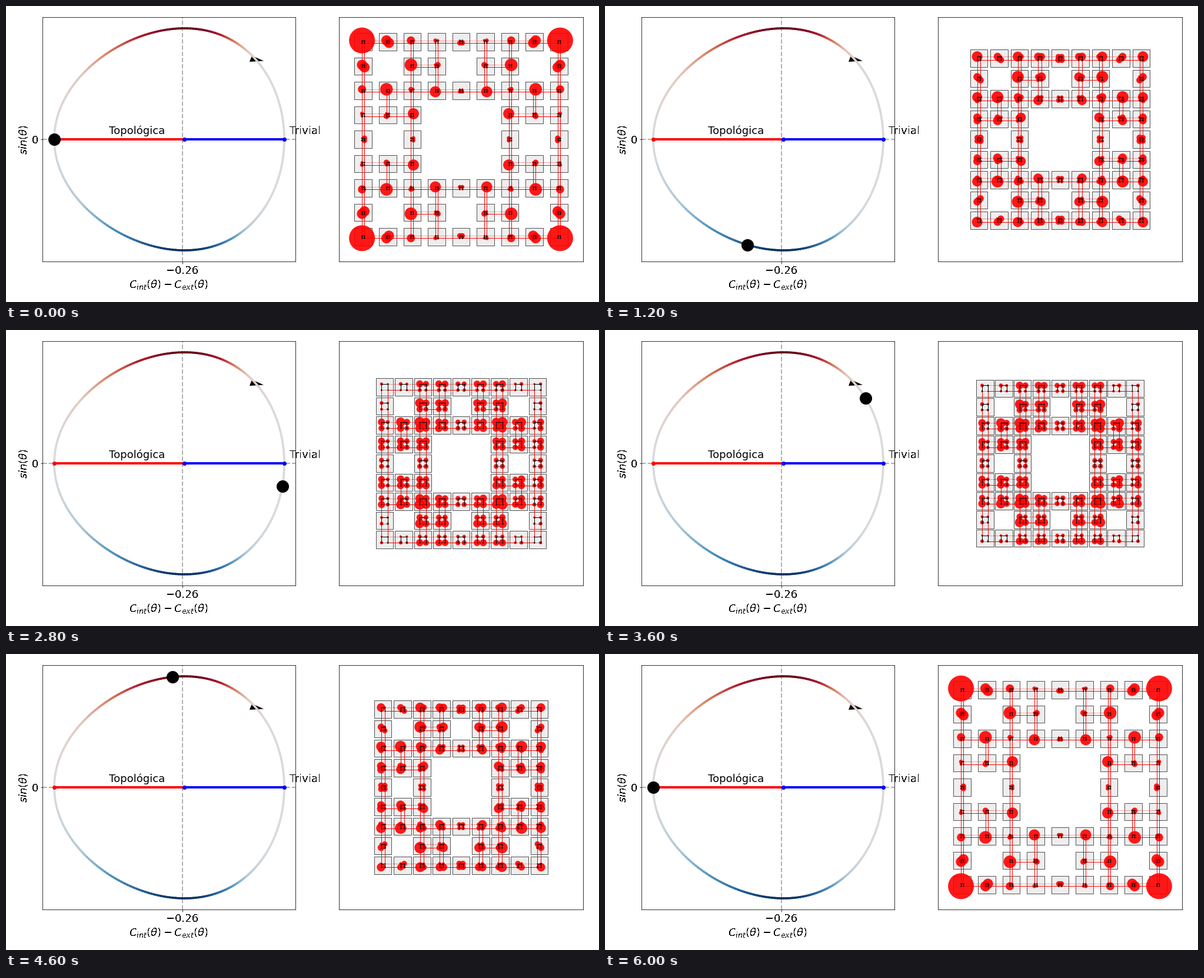
Animation of 1008x504 px, one loop 6200 ms. Source, as a matplotlib script:

```python
import numpy as np
import matplotlib.pyplot as plt
from matplotlib.animation import FuncAnimation
from matplotlib.collections import LineCollection, PolyCollection
from matplotlib.colors import LinearSegmentedColormap

W, H = 1008, 504
STEPS = 30
SIZE = 18
CX, CY = 773.5, 227.0      # middle of the lattice
BOX = 14.8                 # half side of a cell


def panel(fig, x0, x1, y0, y1):
    """Axes whose data units are stage pixels, y pointing down."""
    ax = fig.add_axes([x0 / W, 1 - y1 / H, (x1 - x0) / W, (y1 - y0) / H])
    ax.set_xlim(x0, x1)
    ax.set_ylim(y1, y0)
    return ax


# ---------------------------------------------------------------- cycle

def cycle(t):
    x = 290.5 + 193.9 * np.cos(t) - 13 * np.cos(2 * t) + 1.6 * np.cos(3 * t)
    return x, CY - 189 * np.sin(t)


def draw_cycle(ax):
    cmap = LinearSegmentedColormap.from_list("cycle", [
        "#053061", "#2a689f", "#5598c0", "#b0c8d6", "#dadadc",
        "#e4c8be", "#d6785a", "#b2182b", "#67001f"])
    ax.axvline(300, color="#b0b0b0", lw=2, ls="--", zorder=1)
    ax.axhline(CY, color="#b0b0b0", lw=2, ls="--", zorder=1)
    ax.fill([418, 414, 438], [84.5, 95, 93.5], color="black", lw=0, zorder=2)

    t = np.linspace(0, 2 * np.pi, 241)
    pts = np.column_stack(cycle(t))
    segs = np.stack([pts[:-1], pts[1:]], axis=1)
    mid = (t[:-1] + t[1:]) / 2
    s = np.sin(mid)
    tone = np.sign(s) * np.abs(s) ** (4.6 + 2.6 * np.cos(mid))
    curve = LineCollection(segs, cmap=cmap, lw=3.5, capstyle="projecting",
                           zorder=3)
    curve.set_array(tone)
    curve.set_clim(-1, 1)
    ax.add_collection(curve)

    for x0, x1, color in ((82.3, 303.3, "red"), (303.3, 473.3, "blue")):
        ax.plot([x0, x1], [CY, CY], color=color, lw=4, marker="o", ms=6,
                zorder=4)

    # text outside the panel has hard edges
    hard = dict(fontsize=SIZE, antialiased=False)
    ax.text(175, 218, "Topológica", fontsize=SIZE)
    ax.text(482, 218, "Trivial", **hard)
    ax.set_xticks([300], ["−0.26"], **hard)
    ax.set_yticks([CY], ["0"], **hard)
    ax.set_xlabel(r"$C_{int}(\theta)-C_{ext}(\theta)$", **hard)
    ax.set_ylabel(r"$sin(\theta)$", **hard)


# -------------------------------------------------------------- lattice

def is_hole(i, j):
    return (i % 3 == 1 and j % 3 == 1) or (i // 3 == 1 and j // 3 == 1)


CELLS = [(i, j) for i in range(9) for j in range(9) if not is_hole(i, j)]
INDEX = {c: n for n, c in enumerate(CELLS)}
GRID = np.array([(j - 4, i - 4) for i, j in CELLS], float)
# site order in a cell: top left, top right, bottom left, bottom right
CORNERS = np.array([(-1, -1), (1, -1), (-1, 1), (1, 1)], float)
RIGHT = [(n, INDEX[i, j + 1]) for n, (i, j) in enumerate(CELLS)
         if (i, j + 1) in INDEX]
DOWN = [(n, INDEX[i + 1, j]) for n, (i, j) in enumerate(CELLS)
        if (i + 1, j) in INDEX]


def hopping():
    """Inner and outer hopping from (TL, BR) sites to (TR, BL) sites."""
    n = len(CELLS)
    inner = np.kron(np.eye(n), [[1, 1], [1, -1]])
    outer = np.zeros((2 * n, 2 * n))
    for a, b in RIGHT:
        outer[2 * a, 2 * b] = 1
        outer[2 * b + 1, 2 * a + 1] = -1
    for a, b in DOWN:
        outer[2 * a + 1, 2 * b] = 1
        outer[2 * b, 2 * a + 1] = 1
    return inner, outer


INNER, OUTER = hopping()


def density(t):
    """Weight of the four mid-gap states on every site."""
    c = 0.43 * np.cos(t)
    u, _, vt = np.linalg.svd((1 + c) * INNER + (1 - c) * OUTER)
    even = (vt[-2:] ** 2).sum(axis=0).reshape(-1, 2)
    odd = (u[:, -2:] ** 2).sum(axis=1).reshape(-1, 2)
    return np.column_stack([even[:, 0], odd[:, 0], odd[:, 1], even[:, 1]])


def layout(t):
    pitch = 34.88 - 4.5 * np.cos(t) + 2.18 * np.cos(2 * t)
    half = (7.0 + 3.25 * np.cos(t) + 0.45 * np.cos(2 * t)) / 2
    centers = np.array([CX, CY]) + pitch * GRID
    return centers, centers[:, None, :] + half * CORNERS


def links(sites, pairs, p, q):
    return [(sites[a, p], sites[b, q]) for a, b in pairs]


def bonds(ax, color, lw, ls, z):
    lines = LineCollection([], colors=color, linewidths=lw, linestyles=ls,
                           zorder=z)
    ax.add_collection(lines)
    return lines


fig = plt.figure(figsize=(W / 72, H / 72), dpi=72, facecolor="white")
left = panel(fig, 62, 492, 19, 435)
right = panel(fig, 566, 981, 19, 435)
right.set_xticks([])
right.set_yticks([])
draw_cycle(left)
ball, = left.plot([], [], "o", color="black", ms=20, zorder=5)

boxes = PolyCollection([], facecolors="#eeeeee", edgecolors="#404040",
                       linewidths=0.9, zorder=1)
right.add_collection(boxes)
start = layout(np.pi)[1].reshape(-1, 2)
blobs = right.scatter(*start.T, s=1, color="red", alpha=0.9, lw=0, zorder=2)
outer_solid = bonds(right, "red", 1, "solid", 3)
outer_dots = bonds(right, "red", 1, "dotted", 3)
inner_solid = bonds(right, "black", 1, "solid", 4)
inner_dots = bonds(right, "black", 1, "dotted", 4)
dots = right.scatter(*start.T, s=4.5, color="black", lw=0, zorder=5)
right.set_xlim(566, 981)
right.set_ylim(435, 19)

SELF = [(n, n) for n in range(len(CELLS))]
SQUARE = BOX * CORNERS[[0, 1, 3, 2]]


def update(k):
    t = np.pi + 2 * np.pi * (k % STEPS) / STEPS
    x, y = cycle(t)
    ball.set_data([x], [y])

    centers, sites = layout(t)
    flat = sites.reshape(-1, 2)
    boxes.set_verts(list(centers[:, None, :] + SQUARE))
    blobs.set_offsets(flat)
    blobs.set_sizes(6200 * density(t).ravel())
    dots.set_offsets(flat)
    outer_solid.set_segments(links(sites, RIGHT, 3, 2)
                             + links(sites, DOWN, 2, 0)
                             + links(sites, DOWN, 3, 1))
    outer_dots.set_segments(links(sites, RIGHT, 1, 0))
    inner_solid.set_segments(links(sites, SELF, 0, 1)
                             + links(sites, SELF, 0, 2)
                             + links(sites, SELF, 1, 3))
    inner_dots.set_segments(links(sites, SELF, 2, 3))
    return ball, boxes, blobs, dots


anim = FuncAnimation(fig, update, frames=STEPS + 1, interval=200,
                     init_func=lambda: update(0), repeat=True,
                     repeat_delay=0, blit=False)
plt.show()
```
